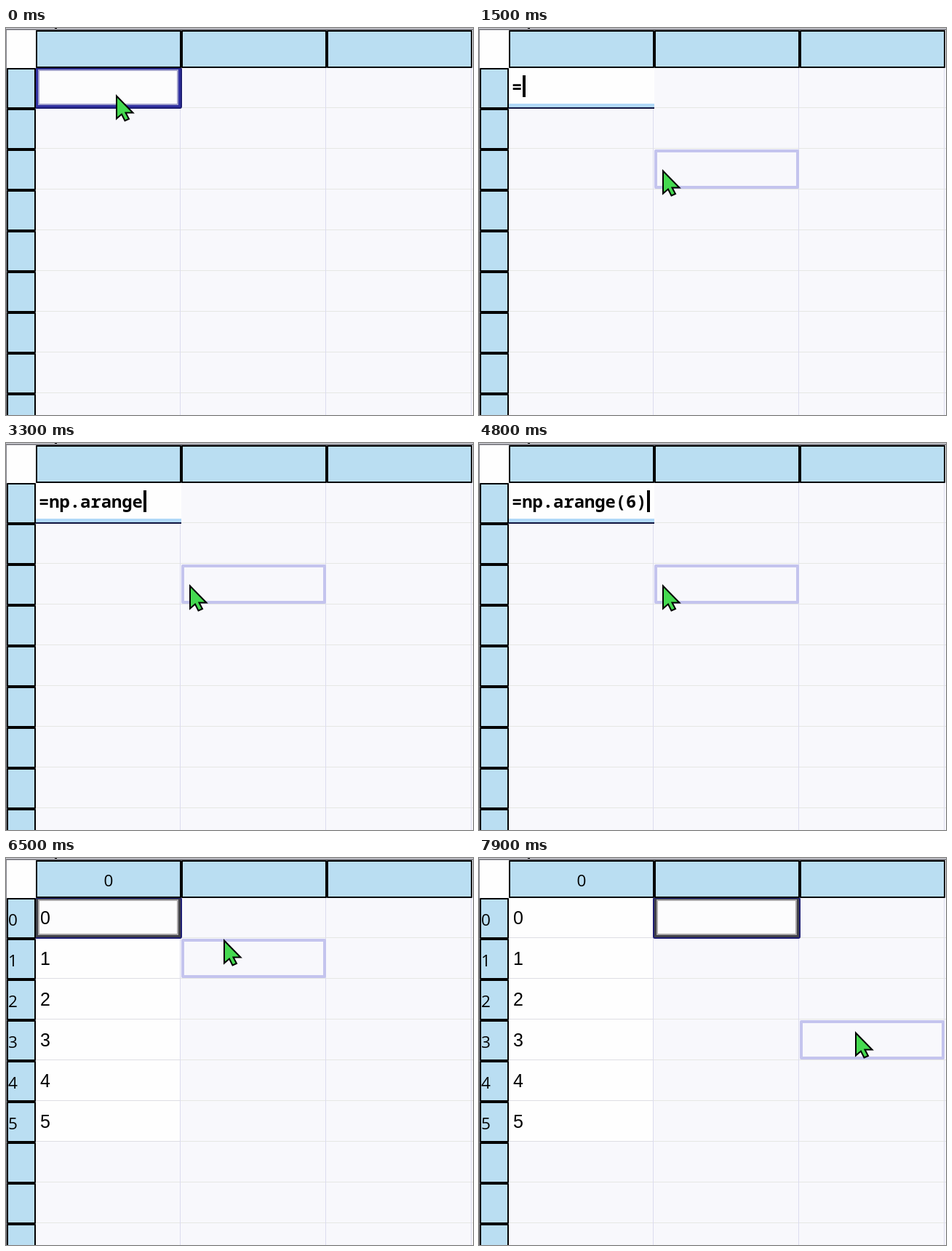
Recreate the animation shown at these times as an HTML page with a canvas. Size 642 px wide and 532 px high, loop 8 s.

```html
<!DOCTYPE html>
<html>
<head>
<meta charset="utf-8">
<style>
html, body { margin: 0; width: 100%; height: 100%; overflow: hidden; }
canvas { display: block; }
</style>
</head>
<body>
<canvas id="stage" width="642" height="532"></canvas>
<script>
const ctx = document.getElementById('stage').getContext('2d');
const LOOP = 8000, LEFT = 41, TOP = 55, CW = 200, RH = 56;
const EDIT_START = 1300, EDIT_END = 5400, CLICK = 7100;
const FORMULA = '=np.arange(6)';
const KEYS = [1300, 1800, 2500, 2600, 2700, 2800, 2900, 3000, 3100, 3200, 3700, 4000, 4300];
// Pointer stops: time, x, y
const PATH = [
  [0, 151, 93], [150, 151, 93], [550, 252, 196], [5900, 252, 196],
  [6400, 299, 113], [6500, 299, 113], [6950, 335, 78], [7250, 335, 78],
  [7850, 517, 240], [8000, 517, 240]
];
const ARROW = [[0, 0], [0, 31], [7, 25], [11.5, 34], [17, 31.5], [12.5, 23], [22.5, 23]];
const CELL_FONT = '25px "Liberation Sans", Arial, sans-serif';
const HEADER_FONT = '22.5px "Open Sans", sans-serif';
const EDIT_FONT = 'bold 23.8px "Noto Sans Mono", monospace';

function rect(color, x, y, w, h) {
  ctx.fillStyle = color;
  ctx.fillRect(x, y, w, h);
}

function frame(color, x, y, w, h, line) {
  ctx.strokeStyle = color;
  ctx.lineWidth = line;
  ctx.lineJoin = 'round';
  ctx.strokeRect(x + line / 2, y + line / 2, w - line, h - line);
}

function text(str, x, y, font, align = 'left') {
  ctx.font = font;
  ctx.textAlign = align;
  ctx.fillStyle = '#000';
  ctx.fillText(str, x, y);
}

function pointerAt(t) {
  const i = PATH.findIndex(p => p[0] > t);
  const [t0, x0, y0] = PATH[i - 1], [t1, x1, y1] = PATH[i];
  const u = (t - t0) / (t1 - t0), k = u * u * (3 - 2 * u);
  return { x: x0 + (x1 - x0) * k, y: y0 + (y1 - y0) * k };
}

function drawGrid(filled) {
  rect('#f8f8fc', 0, 0, 642, 532);
  if (filled) rect('#fefefe', LEFT, TOP, 198, 6 * RH - 2);
  for (let y = 109; y < 532; y += RH) rect('#e6e7e4', LEFT, y, 601, 1);
  for (let x = 239; x < 642; x += CW) rect('#dcdcee', x, TOP, 1, 477);
  if (filled) for (let i = 0; i < 6; i++) rect('#dedee4', LEFT, 109 + RH * i, 198, 1);
}

function drawHeaders(filled) {
  const cell = (x, y, w, h) => {
    rect('#badef2', x, y, w, h);
    frame('#000', x, y, w, h, 2);
  };
  rect('#fefefe', 0, 0, LEFT, TOP);
  for (let c = 0; c < 3; c++) cell(LEFT + CW * c, 3, CW, 52);
  for (let r = 0; r < 9; r++) {
    cell(1, TOP + RH * r, 40, RH);
    if (filled && r < 6) text(r, 3, 93 + RH * r, HEADER_FONT);
  }
  if (filled) text(0, 141, 39, HEADER_FONT, 'center');
  rect('#dcdce2', 0, 0, 642, 1);
  rect('#85858c', 0, 1, 642, 2);
  rect('#85858c', 0, 3, 1, 529);
  rect('#000', 67, 0, 3, 1);
}

function drawSelection(col, hovered) {
  const x = 39 + CW * col;
  ctx.fillStyle = '#1c1c72';
  ctx.beginPath();
  ctx.roundRect(x, 54, 203, 57, 3);
  ctx.fill();
  rect(hovered ? '#3030a0' : '#404048', x + 2, 56, 199, 53);
  rect(hovered ? '#a0a0cc' : '#aaa8a8', x + 5, 57, 193, 49);
  rect('#fcfcfd', x + 7, 59, 189, 45);
}

function drawHover(col, row) {
  const x = LEFT + CW * col, y = TOP + RH * row;
  frame('#c4c4ee', x, y, 199, 54, 4);
}

function drawEditor(t) {
  const count = KEYS.filter(k => k <= t).length;
  rect('#fefefe', LEFT, TOP, CW, 49);
  rect('#b0d8f8', LEFT, 104, CW, 5);
  rect('#101440', LEFT, 109, CW, 2);
  text(FORMULA.slice(0, count), 45, 89, EDIT_FONT);
  const idle = t - KEYS[count - 1];
  if (idle % 1060 < 530) rect('#000', Math.round(45.5 + 14.3 * count), 65, 4, 30);
}

function drawPointer({ x, y }) {
  ctx.beginPath();
  ARROW.forEach(([dx, dy]) => ctx.lineTo(x + dx + 1, y + dy + 0.5));
  ctx.closePath();
  ctx.lineJoin = 'miter';
  ctx.lineWidth = 2;
  ctx.fillStyle = '#45d950';
  ctx.strokeStyle = '#000';
  ctx.fill();
  ctx.stroke();
}

function draw(t) {
  const pointer = pointerAt(t);
  const col = Math.floor((pointer.x - LEFT) / CW);
  const row = Math.floor((pointer.y - TOP) / RH);
  const selected = t < CLICK ? 0 : 1;
  const editing = t >= EDIT_START && t < EDIT_END;
  const filled = t >= EDIT_END;
  const onSelected = row === 0 && col === selected;

  drawGrid(filled);
  if (!onSelected) drawHover(col, row);
  if (editing) drawEditor(t);
  else drawSelection(selected, onSelected);
  if (filled) for (let i = 0; i < 6; i++) text(i, 47, 91 + RH * i, CELL_FONT);
  drawHeaders(filled);
  drawPointer(pointer);
}

const start = performance.now();
function tick() {
  draw((performance.now() - start) % LOOP);
  requestAnimationFrame(tick);
}
tick();
</script>
</body>
</html>
```
